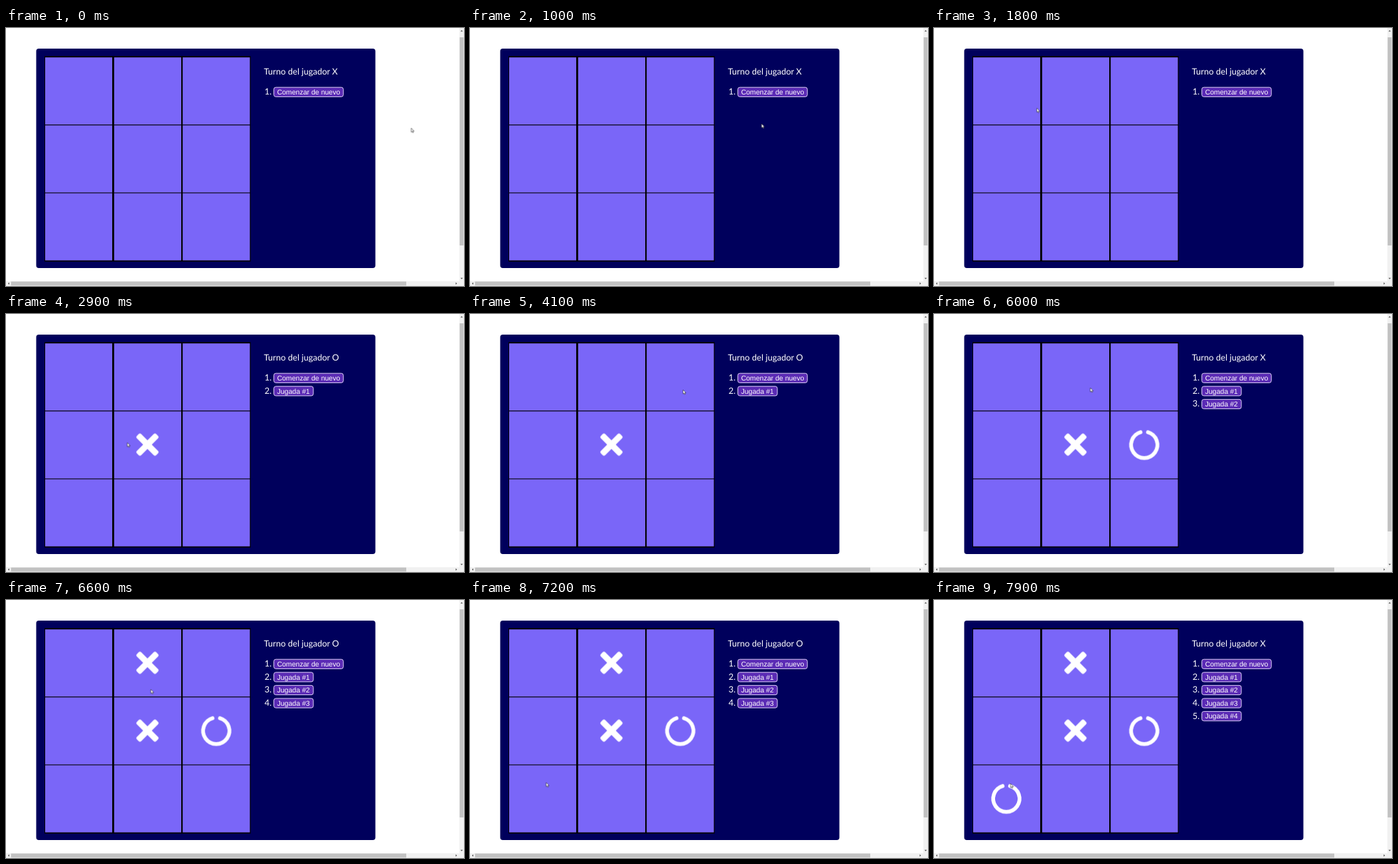
Recreate the animation shown at these times as an HTML page. Size 690 px wide and 388 px high, loop 8000 ms.

```html
<!DOCTYPE html>
<html lang="es">
<head>
<meta charset="utf-8">
<title>Tres en raya</title>
<style>
  html, body { margin: 0; width: 100%; height: 100%; overflow: hidden; background: #fff; }
  svg { display: block; width: 690px; height: 388px; }
  text { fill: #fff; text-rendering: geometricPrecision; }
  .turn, .num { font: 13px Lato, sans-serif; }
  .num { text-anchor: end; }
  .label { font: 10.55px "Liberation Sans", Arial, sans-serif; }
  .button { fill: #5b2bb5; stroke: #e0d2f8; stroke-width: 1; }
  .cell { fill: #7a66f8; }
  .cross { fill: #fff; }
  .ring { fill: none; stroke: #fff; stroke-width: 5.7; stroke-linecap: round; }
  .track { fill: #f1f1f1; }
  .thumb { fill: #c1c1c1; }
  .arrow { fill: #505050; }

  .m1, .m2, .m3, .m4, .x, .o { animation: 8s step-end infinite; }
  .m1 { animation-name: move1; }
  .m2 { animation-name: move2; }
  .m3 { animation-name: move3; }
  .m4 { animation-name: move4; }
  .x { animation-name: turnX; }
  .o { animation-name: turnO; }
  @keyframes move1 { 0% { opacity: 0 } 36.25%, 100% { opacity: 1 } }
  @keyframes move2 { 0% { opacity: 0 } 65%, 100% { opacity: 1 } }
  @keyframes move3 { 0% { opacity: 0 } 80%, 100% { opacity: 1 } }
  @keyframes move4 { 0% { opacity: 0 } 98.75%, 100% { opacity: 1 } }
  @keyframes turnX { 0%, 65%, 98.75%, 100% { opacity: 1 } 36.25%, 80% { opacity: 0 } }
  @keyframes turnO { 0%, 65%, 98.75%, 100% { opacity: 0 } 36.25%, 80% { opacity: 1 } }

  /* The pointer advances in 100 ms ticks */
  #pointer { animation: glide 8s step-end infinite; }
  @keyframes glide {
    0% { transform: translate(610.5px, 150.5px) }
    2.5% { transform: translate(592.5px, 160px) }
    7.5% { transform: translate(610.5px, 162px) }
    8.75% { transform: translate(610.5px, 162px); animation-timing-function: steps(8, end) }
    18.75% { transform: translate(154px, 114px) }
    21.25% { transform: translate(154px, 114px) }
    22.5% { transform: translate(155px, 120.5px); animation-timing-function: steps(2, end) }
    25% { transform: translate(187px, 195px) }
    26.25% { transform: translate(187px, 195px); animation-timing-function: steps(2, end) }
    28.75% { transform: translate(182.7px, 193.5px) }
    42.5% { transform: translate(182.7px, 193.5px); animation-timing-function: steps(3, end) }
    46.25% { transform: translate(321px, 112.5px) }
    48.75% { transform: translate(321px, 112.5px); animation-timing-function: steps(2, end) }
    51.25% { transform: translate(321px, 114px) }
    58.75% { transform: translate(321px, 114px); animation-timing-function: steps(2, end) }
    61.25% { transform: translate(305px, 190.5px) }
    65% { transform: translate(305px, 190.5px); animation-timing-function: steps(4, end) }
    70% { transform: translate(242px, 119px) }
    71.25% { transform: translate(242px, 119px); animation-timing-function: steps(3, end) }
    75% { transform: translate(235.5px, 111px) }
    81.25% { transform: translate(235.5px, 111px); animation-timing-function: steps(7, end) }
    90% { transform: translate(114.7px, 274.5px) }
    98.75%, 100% { transform: translate(115.3px, 276px) }
  }
</style>
</head>
<body>
<svg viewBox="0 0 690 388">
  <defs>
    <g id="cross" class="cross">
      <rect x="-20.6" y="-4.6" width="41.2" height="9.2" rx="2.9" transform="rotate(45)"/>
      <rect x="-20.6" y="-4.6" width="41.2" height="9.2" rx="2.9" transform="rotate(-45)"/>
    </g>
    <path id="ring" class="ring" d="M5.6 -19a19.8 19.8 0 1 1 -11.2 0"/>
    <g id="row" class="cell">
      <rect x="59" width="101" height="101"/>
      <rect x="163" width="101" height="101"/>
      <rect x="266.2" width="101.2" height="101"/>
    </g>
    <rect id="play" class="button" x="403.5" y="-11" width="59.5" height="14.2" rx="3"/>
  </defs>

  <rect x="45.5" y="31" width="511" height="330" rx="4" fill="#00005c"/>
  <rect x="58" y="42.3" width="310.6" height="309" fill="#000"/>
  <use href="#row" y="44.2"/>
  <use href="#row" y="146.4"/>
  <use href="#row" y="248.5"/>

  <use href="#cross" class="m1" x="213.1" y="196.4"/>
  <use href="#ring" class="m2" x="316.7" y="196.7"/>
  <use href="#cross" class="m3" x="213.1" y="94.4"/>
  <use href="#ring" class="m4" x="109" y="298.7"/>

  <text class="turn x" x="388.5" y="69.5">Turno del jugador X</text>
  <text class="turn o" x="388.5" y="69.5">Turno del jugador O</text>

  <g transform="translate(0 100.2)">
    <text class="num" x="400">1.</text>
    <rect class="button" x="403.5" y="-11" width="104.7" height="14.2" rx="3"/>
    <text class="label" x="408.4" y="-.3">Comenzar de nuevo</text>
  </g>
  <g class="m1"><g transform="translate(0 119.8)">
    <text class="num" x="400">2.</text>
    <use href="#play"/>
    <text class="label" x="408.4" y="-.3">Jugada #1</text>
  </g></g>
  <g class="m2"><g transform="translate(0 139.4)">
    <text class="num" x="400">3.</text>
    <use href="#play"/>
    <text class="label" x="408.4" y="-.3">Jugada #2</text>
  </g></g>
  <g class="m3"><g transform="translate(0 159)">
    <text class="num" x="400">4.</text>
    <use href="#play"/>
    <text class="label" x="408.4" y="-.3">Jugada #3</text>
  </g></g>
  <g class="m4"><g transform="translate(0 178.6)">
    <text class="num" x="400">5.</text>
    <use href="#play"/>
    <text class="label" x="408.4" y="-.3">Jugada #4</text>
  </g></g>

  <rect class="track" x="683" width="7" height="388"/>
  <rect class="track" y="380.7" width="690" height="7.3"/>
  <rect class="thumb" x="683.5" y="14" width="5.8" height="313"/>
  <rect class="thumb" x="7.5" y="381.3" width="595.5" height="6"/>
  <path class="arrow" d="M684.7 5.2l1.8 -2l1.8 2zM684.7 375.8l1.8 2l1.8 -2zM5 382.5l-2 1.8l2 1.8zM677.5 382.5l2 1.8l-2 1.8z"/>

  <path id="pointer" d="M0 0V6.2L1.4 4.9L2.4 7L3.4 6.5L2.5 4.5H4.3Z" fill="#fff" stroke="#222" stroke-width=".6"/>
</svg>
</body>
</html>
```
